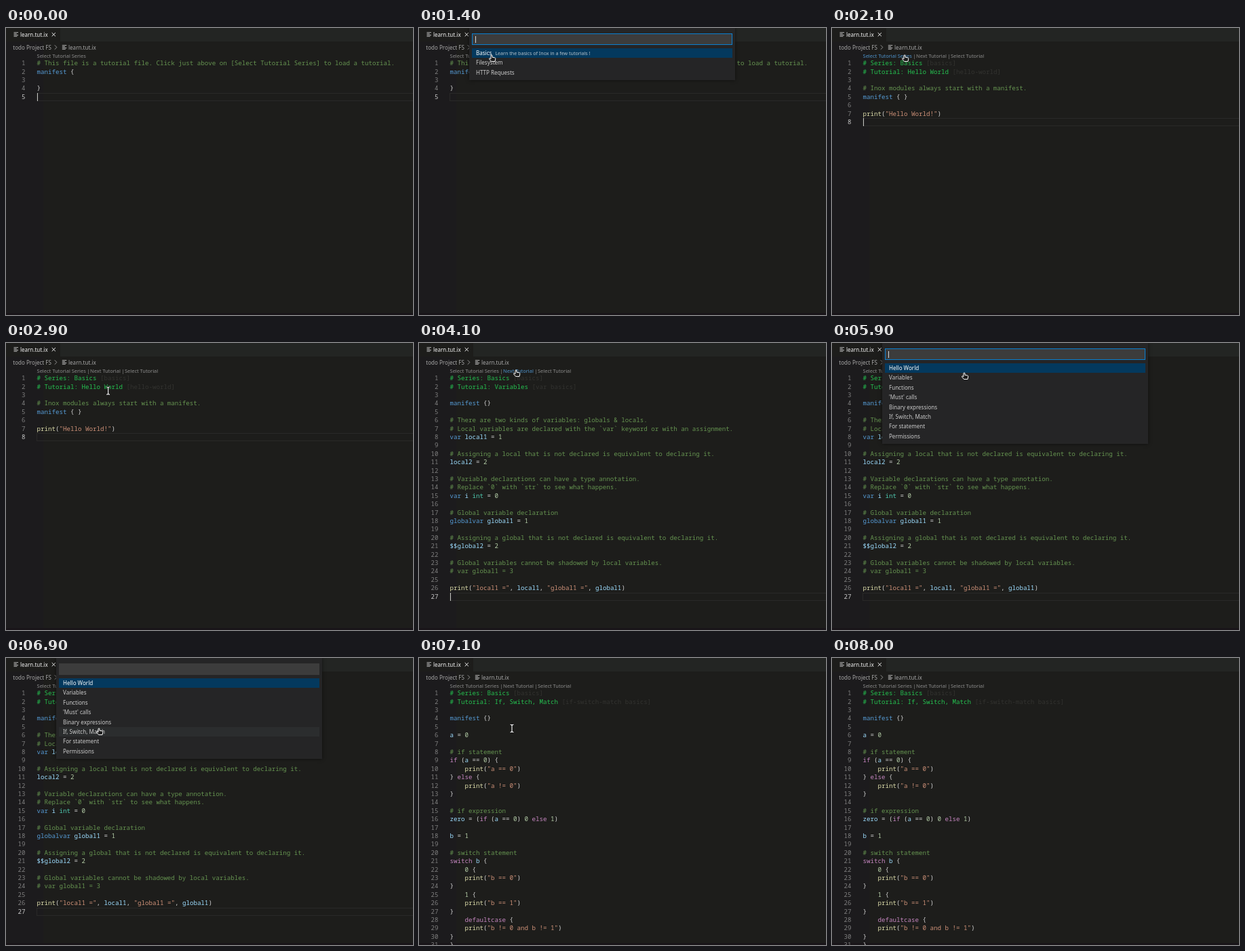
Animation, 600 px wide and 424 px high, one loop 8300 ms. Source, as an HTML page:

```html
<!DOCTYPE html>
<html lang="en">
<head>
<meta charset="utf-8">
<title>Tutorial series in the editor</title>
<style>
html, body { margin: 0; width: 100%; height: 100%; overflow: hidden; background: #1d1d1b; }
#stage { position: relative; width: 600px; height: 424px; overflow: hidden; background: #1d1d1b;
  font: 8.05px/11px "Noto Sans", sans-serif; color: #ccc; white-space: pre; }
#stage div, #stage svg { position: absolute; }
#stage svg { left: 0; top: 0; width: 600px; height: 424px; }
#edge { left: 0; top: 20px; width: 55px; height: 404px; background: #1c1b1d; }
#foot { left: 0; top: 421px; width: 600px; height: 3px; background: #191519; }
#bar { left: 0; top: 0; width: 600px; height: 20px; background: #232523; }
#tab { left: 0; top: 0; width: 80px; height: 20px; background: #1d1d1b; }
#title { left: 21px; top: 4px; color: #f4f4f4; font-size: 8px; }
.crumb { top: 23px; color: #a6a6a6; }
#lens, #items { left: 0; top: 0; }
#lens div { top: 35.5px; font-size: 7.45px; line-height: 10px; color: #8d8d8d; }
#lens .hot { color: #4e94ce; }
#code, #nums { top: 46.1px; font: 9.16px/12.4px "Noto Sans Mono", "DejaVu Sans Mono", monospace; }
#code { left: 45.6px; color: #d4d4d4; }
#nums { left: 0; width: 28.5px; text-align: right; color: #7e7e7e; }
#nums .on { color: #c8c8c8; }
#row { left: 45px; width: 560px; height: 10.4px; border: 1px solid #292928; }
#caret { left: 45.5px; width: 1px; height: 12px; background: #c4c4c2; }
.note { color: #659350; } .head { color: #25c150; } .dim { color: #333330; }
.str { color: #ce9178; } .num { color: #b5cea8; } .key { color: #569cd6; }
.flow { color: #c586c0; } .fn { color: #dcdcaa; } .type { color: #4ec9b0; } .name { color: #9cdcfe; }
#pick { left: 74px; top: 0; width: 392px; background: #252526; box-shadow: 0 0 5px rgba(0,0,0,.55); }
#field { left: 4px; top: 8px; width: 381.5px; height: 15px; background: #3c3c3c; border: 1px solid #3c3c3c; }
#field.focus { border-color: #0a7fd0; }
#field div { left: 4px; top: 3px; width: 1px; height: 9.5px; background: #d8d8d8; }
.item { left: 4px; width: 377.5px; height: 14.4px; padding-left: 6px; line-height: 14.6px; }
.item.over { background: #2b2d2e; }
.item.sel { background: #04395e; color: #fff; }
.item i { font-style: normal; font-size: 7.1px; color: #b9c4cc; margin-left: 5px; }
</style>
</head>
<body>
<div id="stage">
  <div id="edge"></div><div id="foot"></div><div id="bar"></div><div id="tab"></div>
  <div id="title">learn.tut.ix</div>
  <div class="crumb" style="left:10.3px">todo Project FS</div>
  <div class="crumb" style="left:92px">learn.tut.ix</div>
  <svg fill="none" stroke="#c8c8c8">
    <path id="lines" d="M11.5 6.7h6.5M11.5 8.6h4.3M11.5 10.5h6.5M11.5 12.4h5" stroke-width=".9"/>
    <use href="#lines" x="71.3" y="19"/>
    <path d="M67.7 7l5.2 5.2m0-5.2l-5.2 5.2" stroke="#f0f0f0"/>
    <path d="M71.7 25.3l3.2 3.2-3.2 3.2" stroke="#a0a0a0" stroke-width=".9"/>
  </svg>
  <div id="lens"></div>
  <div id="row"></div>
  <div id="nums"></div>
  <div id="code"></div>
  <div id="caret"></div>
  <div id="pick"><div id="field"><div></div></div><div id="items"></div></div>
  <svg>
    <path id="hand" fill="#1c1c1c" stroke="#fff" stroke-linejoin="round"
      d="M-1 4.6V.5Q0-.9 1 .5V3.2L4.8 3.9Q6 4.3 5.8 5.6L5 9.4H-.4L-3.3 6Q-3.6 4.4-2.2 4.6L-1 5.6Z"/>
    <g id="beam" fill="none">
      <path id="stem" stroke="#111" stroke-width="2.6"
        d="M-2.4-5.6Q0-5.6 0-4Q0-5.6 2.4-5.6M0-4.4V4.4M-2.4 5.6Q0 5.6 0 4Q0 5.6 2.4 5.6"/>
      <path id="core" stroke="#f2f2f2" stroke-width="1.2"/>
    </g>
  </svg>
</div>
<script>
const LOOP = 8300, STEP = 100, LINE = 12.4, TOP = 46.1, ROW = 14.4, LIST_TOP = 30;
const $ = id => document.getElementById(id);

const intro = `# This file is a tutorial file. Click just above on [Select Tutorial Series] to load a tutorial.
manifest {

}
`;
const hello = `# Series: Basics [basics]
# Tutorial: Hello World [hello-world]

# Inox modules always start with a manifest.
manifest { }

print("Hello World!")
`;
const variables = `# Series: Basics [basics]
# Tutorial: Variables [var basics]

manifest {}

# There are two kinds of variables: globals & locals.
# Local variables are declared with the \`var\` keyword or with an assignment.
var local1 = 1

# Assigning a local that is not declared is equivalent to declaring it.
local2 = 2

# Variable declarations can have a type annotation.
# Replace \`0\` with \`str\` to see what happens.
var i int = 0

# Global variable declaration
globalvar global1 = 1

# Assigning a global that is not declared is equivalent to declaring it.
$$global2 = 2

# Global variables cannot be shadowed by local variables.
# var global1 = 3

print("local1 =", local1, "global1 =", global1)
`;
const branches = `# Series: Basics [basics]
# Tutorial: If, Switch, Match [if-switch-match basics]

manifest {}

a = 0

# if statement
if (a == 0) {
    print("a == 0")
} else {
    print("a != 0")
}

# if expression
zero = (if (a == 0) 0 else 1)

b = 1

# switch statement
switch b {
    0 {
    print("b == 0")
}
    1 {
    print("b == 1")
}
    defaultcase {
    print("b != 0 and b != 1")
}
}`;

// start time, text, and whether a caret line is on screen
const docs = [
  { from: 0, text: intro, caret: true },
  { from: 2100, text: hello, caret: true },
  { from: 3900, text: variables, caret: true },
  { from: 7000, text: branches, caret: false }
];
const series = [['Basics', 'Learn the basics of Inox in a few tutorials !'], ['Filesystem'], ['HTTP Requests']];
const tutorials = ['Hello World', 'Variables', 'Functions', "'Must' calls", 'Binary expressions',
  'If, Switch, Match', 'For statement', 'Permissions'].map(s => [s]);
const picks = [
  { from: 1000, blur: 2000, to: 2100, list: series },
  { from: 5500, blur: 6900, to: 7000, list: tutorials }
];
const lensParts = [[45.6, 118, 'Select Tutorial Series'], [119.5, 0, '|'], [124, 170, 'Next Tutorial'],
  [170.4, 0, '|'], [175, 226, 'Select Tutorial']];
// pointer stops: time, x, y
const path = [[100, 220, 292], [900, 107, 40], [2400, 107, 40], [2900, 150.6, 70.6], [3400, 143, 40],
  [4200, 143, 40], [5100, 197, 42], [5800, 197, 42], [6700, 137, 104], [7200, 137, 104], [7800, 275, 408]];

const esc = s => s.replace(/&/g, '&amp;').replace(/</g, '&lt;');
const span = (cls, s) => `<span class="${cls}">${esc(s)}</span>`;
const words = { manifest: 'key', var: 'key', globalvar: 'key', if: 'flow', else: 'flow',
  switch: 'flow', defaultcase: 'flow', print: 'fn', int: 'type' };

function paintLine(line) {
  const head = line.match(/^(# (?:Series|Tutorial): [^[]+)(.*)/);
  if (head) return span('head', head[1]) + span('dim', head[2]);
  if (line[0] === '#') return span('note', line);
  return line.replace(/"[^"]*"|\d+\b|[$\w]+/g, s =>
    span(s[0] === '"' ? 'str' : /^\d/.test(s) ? 'num' : words[s] || 'name', s));
}

for (const d of docs) {
  const lines = d.text.split('\n');
  d.count = lines.length;
  d.html = lines.map(paintLine).join('\n');
  d.nums = lines.map((_, i) => d.caret && i === d.count - 1 ? span('on', `${i + 1}`) : i + 1).join('\n');
}
$('lens').innerHTML = lensParts.map(p => `<div style="left:${p[0]}px">${p[2]}</div>`).join('');
$('core').setAttribute('d', $('stem').getAttribute('d'));

function pointerAt(t) {
  if (t < path[0][0] || t >= LOOP - 500) return null;
  const k = path.findIndex(p => p[0] > t);
  const [t0, x0, y0] = path[k - 1], [t1, x1, y1] = path[k];
  const u = (t - t0) / (t1 - t0), e = u * u * (3 - 2 * u);
  return { x: x0 + (x1 - x0) * e, y: y0 + (y1 - y0) * e };
}

const blink = age => age % 1000 < 500;
const show = (id, on) => { $(id).style.display = on ? '' : 'none'; };
let shownDoc, shownPick;

function draw(t) {
  const doc = docs.filter(d => d.from <= t).pop();
  const pick = picks.find(p => t >= p.from && t < p.to);
  const mouse = pointerAt(t);

  if (doc !== shownDoc) {
    shownDoc = doc;
    $('code').innerHTML = doc.html;
    $('nums').innerHTML = doc.nums;
    const y = TOP + (doc.count - 1) * LINE;
    $('row').style.top = $('caret').style.top = y + 'px';
    show('row', doc.caret);
  }
  show('caret', doc.caret && !pick && blink(t - doc.from));

  const overLens = mouse && !pick && mouse.y > 36 && mouse.y < 46;
  let hot = false;
  lensParts.forEach(([x0, x1], i) => {
    const el = $('lens').children[i];
    const over = overLens && mouse.x >= x0 && mouse.x <= x1;
    el.style.display = i && doc === docs[0] ? 'none' : '';
    el.className = over ? 'hot' : '';
    hot = hot || over;
  });

  show('pick', pick);
  if (pick) {
    if (pick !== shownPick) {
      $('items').innerHTML = pick.list.map(([name, info], i) =>
        `<div class="item" style="top:${LIST_TOP + i * ROW}px">${esc(name)}${info ? `<i>${info}</i>` : ''}</div>`).join('');
      $('pick').style.height = LIST_TOP + pick.list.length * ROW + 3.5 + 'px';
    }
    const focus = t < pick.blur;
    $('field').className = focus ? 'focus' : '';
    $('field').firstChild.style.display = focus && blink(t - pick.from) ? '' : 'none';
    const over = mouse ? Math.floor((mouse.y - LIST_TOP) / ROW) : -1;
    [...$('items').children].forEach((el, i) => {
      el.className = 'item' + (i === 0 ? ' sel' : i === over ? ' over' : '');
    });
  }
  shownPick = pick;

  const hand = pick || hot;
  show('hand', mouse && hand);
  show('beam', mouse && !hand);
  if (mouse) $(hand ? 'hand' : 'beam').setAttribute('transform', `translate(${mouse.x} ${mouse.y})`);
}

const start = performance.now();
function tick() {
  const t = (performance.now() - start) % LOOP;
  draw(Math.floor(t / STEP) * STEP);
  requestAnimationFrame(tick);
}
tick();
</script>
</body>
</html>
```
